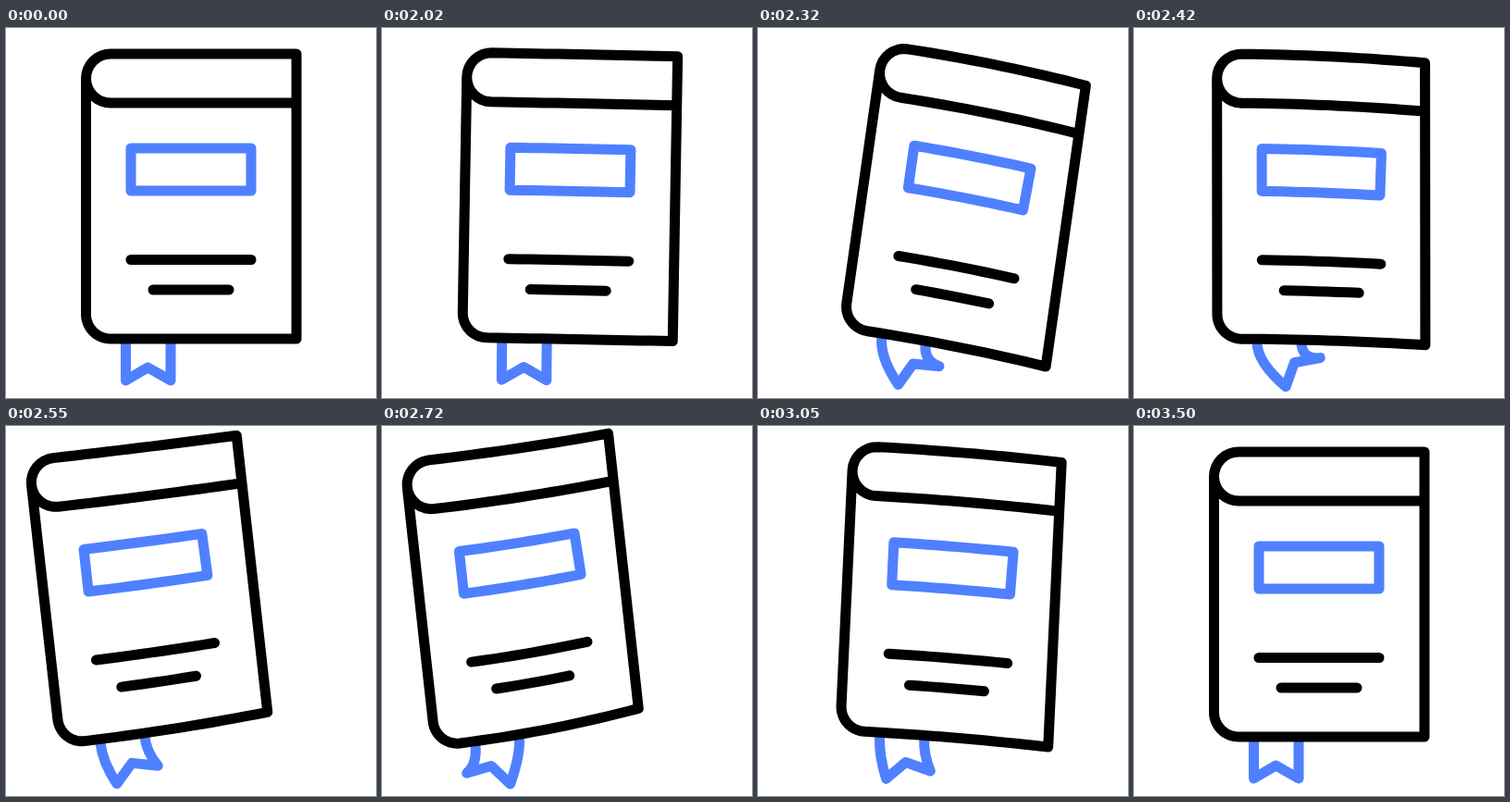
These frames come from a looping animation (400x400 px, 3520 ms). An HTML page with a canvas:

```html
<!DOCTYPE html>
<html>
<head>
<meta charset="utf-8">
<title>Swinging book</title>
<style>
  html, body { margin: 0; height: 100%; overflow: hidden; background: #fff; }
  canvas { display: block; width: 400px; height: 400px; }
</style>
</head>
<body>
<canvas id="stage" width="400" height="400"></canvas>
<script>
const ctx = document.getElementById('stage').getContext('2d');
const LOOP = 3520, BLACK = '#000', BLUE = '#4f80ff';

// time, spine foot x and y, tilt, bend, extra bend towards the foot, ribbon swing
const KEYS = [
  [1990, 87, 336, 0, 0, 0, 0],
  [2020, 87.3, 334.4, 0.95, 0.3, 0, 0.5],
  [2150, 93, 314.5, 13.5, 12.3, 0, 12],
  [2200, 93.5, 313, 14.8, 13, 0, 6],
  [2420, 90.5, 336, 0, 8.5, -1.5, -40],
  [2520, 63, 342, -5.5, -3, -3, -30],
  [2620, 55, 346, -7.5, -10, -4.5, -5],
  [2720, 58.5, 346, -6.3, -12, -4.5, 14],
  [3050, 89.3, 329, 2.7, 7.5, 0, -10],
  [3250, 88.2, 333, 1.4, 3.5, 0, 7],
  [3500, 87, 336, 0, 0, 0, 0]
];

// Monotone cubic interpolation: no overshoot, flat at the extremes
function slope(i, k) {
  if (i === 0 || i === KEYS.length - 1) return 0;
  const [a, b, c] = [KEYS[i - 1], KEYS[i], KEYS[i + 1]];
  const p = (b[k] - a[k]) / (b[0] - a[0]), q = (c[k] - b[k]) / (c[0] - b[0]);
  return p * q <= 0 ? 0 : 2 * p * q / (p + q);
}

function poseAt(time) {
  const last = KEYS.length - 1;
  if (time <= KEYS[0][0] || time >= KEYS[last][0]) return KEYS[0].slice(1);
  let i = 0;
  while (time >= KEYS[i + 1][0]) i++;
  const a = KEYS[i], b = KEYS[i + 1], span = b[0] - a[0], t = (time - a[0]) / span;
  const ease = t * t * (3 - 2 * t);
  return a.slice(1).map((from, n) => {
    const k = n + 1;
    return from + (b[k] - from) * ease + span * t * (1 - t) *
      ((1 - t) * slope(i, k) - t * slope(i + 1, k));
  });
}

function rotate(x, y, degrees) {
  const r = degrees * Math.PI / 180, c = Math.cos(r), s = Math.sin(r);
  return [x * c - y * s, x * s + y * c];
}

function arc(cx, cy, r, from, to) {
  return Array.from({ length: 17 }, (_, i) => {
    const a = (from + (to - from) * i / 16) * Math.PI / 180;
    return [cx + r * Math.cos(a), cy + r * Math.sin(a)];
  });
}

const COVER = [[314, 81], ...arc(113, 54.5, 26.5, 90, 270), [314, 28], [314, 336],
  ...arc(113, 309.5, 26.5, 90, 180), [86.5, 54.5]];

function draw(time) {
  const [footX, footY, tilt, bend, twist, swing] = poseAt(time);

  const place = (x, y) => {
    const s = (x - 87) / 227, v = bend + twist * (y - 182) / 154;
    const [dx, dy] = rotate(x - 87 - bend * bend / 28 * s * s, y - 336 + v * s * s, tilt);
    return [footX + dx, footY + dy];
  };

  const stroke = (points, color) => {
    ctx.strokeStyle = color;
    ctx.beginPath();
    ctx.moveTo(...place(...points[0]));
    points.slice(1).forEach(([x, y], i) => {
      const [px, py] = points[i];
      const steps = Math.ceil(Math.hypot(x - px, y - py) / 12);
      for (let n = 1; n <= steps; n++) {
        ctx.lineTo(...place(px + (x - px) * n / steps, py + (y - py) * n / steps));
      }
    });
    ctx.stroke();
  };

  ctx.fillStyle = '#fff';
  ctx.fillRect(0, 0, 400, 400);
  ctx.lineWidth = 11;
  ctx.lineCap = ctx.lineJoin = 'round';

  // Ribbon: fixed to the book at the top, its tail swings freely
  const [midX, midY] = place(153.7, 341);
  const tail = (x, y) => {
    const [dx, dy] = rotate(x, y, swing);
    return [midX + dx, midY + dy];
  };
  ctx.strokeStyle = BLUE;
  ctx.beginPath();
  ctx.moveTo(...place(129.5, 339));
  ctx.quadraticCurveTo(...place(129.5, 361), ...tail(-24.2, 40));
  ctx.lineTo(...tail(-0.4, 26));
  ctx.lineTo(...tail(24.3, 40));
  ctx.quadraticCurveTo(...place(178, 357), ...place(178, 339));
  ctx.stroke();

  // The label's right side leans with the bend
  const lean = bend * 0.095;
  stroke([[135, 130], [265 + lean, 130], [265 - lean, 176], [135, 176], [135, 130]], BLUE);
  stroke([[135, 250.5], [265, 250.5]], BLACK);
  stroke([[159, 283], [241, 283]], BLACK);
  stroke(COVER, BLACK);
}

function tick(now) {
  draw(now % LOOP);
  requestAnimationFrame(tick);
}
requestAnimationFrame(tick);
</script>
</body>
</html>
```
